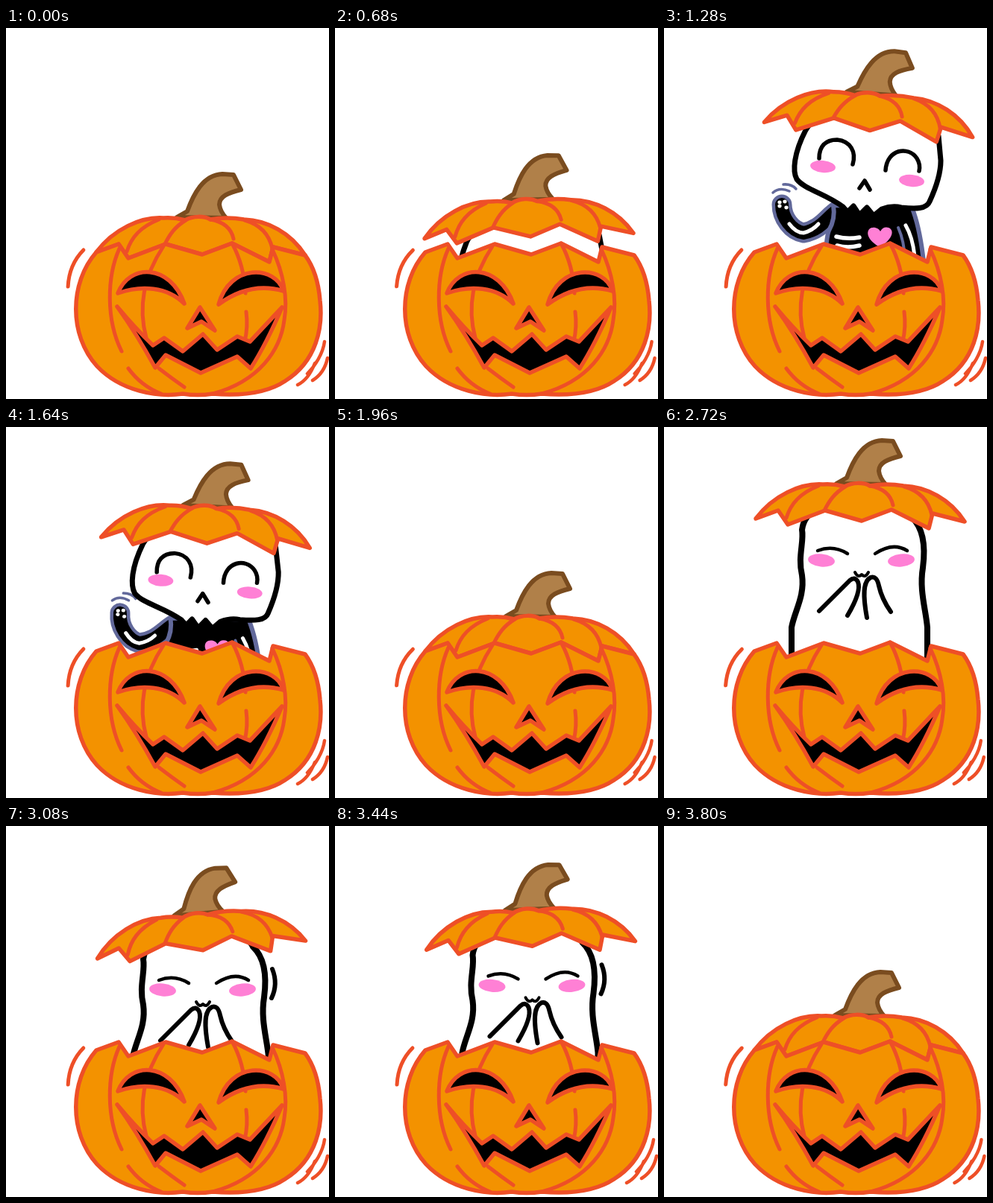
These frames come from a looping animation (433 by 498 pixels, 3840 ms). An HTML page with a canvas:

```html
<!DOCTYPE html>
<html lang="en">
<head>
<meta charset="utf-8">
<title>Pumpkin surprise</title>
<style>
html, body { margin: 0; width: 100%; height: 100%; overflow: hidden; background: #fff; }
canvas { display: block; width: 433px; height: 498px; }
</style>
</head>
<body>
<canvas id="stage" width="433" height="498"></canvas>
<script>
const ctx = document.getElementById('stage').getContext('2d');
const LOOP = 3840, STEP = 40;
const ORANGE = '#f39200', RED = '#ee4f27', BROWN = '#b08049', BARK = '#7a4c1f';
const PINK = '#ff80d5', GLOW = '#62699b', BLACK = '#000', WHITE = '#fff';
ctx.lineCap = ctx.lineJoin = 'round';

const ZIGZAG = 'L358 294L353 314L303 289L263 304L214 290L164 309L151 290L121 301';
const body = new Path2D('M121 301C85 342 84 412 122 454C154 488 204 496 237 491C250 493 264 493 277 491C314 494 350 490 374 474C417 447 425 401 421 366C419 341 412 320 401 305' + ZIGZAG + 'Z');
const bodyLines = new Path2D('M152 296C135 334 134 392 155 434M211 293C186 331 176 371 188 416M164 457C175 472 190 484 208 491M205 457C218 467 229 475 239 482M303 289C314 309 320 333 321 356M322 381C324 396 323 408 320 421M357 297C372 329 378 363 373 392C368 432 340 474 277 491');
const lid = new Path2D('M121 301C144 270 181 253 211 255Q226 254 240 258C251 252 265 252 274 257Q296 253 319 257C350 258 382 275 401 305' + ZIGZAG + 'Z');
const lidLines = new Path2D('M205 257C180 267 168 281 162 300M241 258C226 267 219 278 213 290M274 257C291 260 302 269 305 283M320 258C341 264 353 278 357 296');
const stem = new Path2D('M229 254L243 246C251 224 264 197 290 196L305 197L315 217C298 221 286 226 286 237Q287 246 295 255Z');
const pumpkinEyes = new Path2D('M150 356C165 316 220 316 239 370C216 347 181 345 150 356ZM285 371C300 316 361 318 372 353C341 344 312 351 285 371Z');
const nose = new Path2D('M260 375L243 403L262 394L280 406Z');
const mouth = new Path2D('M149 374Q174 404 197 426L212 416L237 434L264 411L283 432L310 414L327 421L370 375Q349 424 328 457L310 441L261 463L214 439L200 456Q175 410 149 374Z');

const head = new Path2D('M190 137C174 168 172 192 178 203C189 217 216 222 240 240L246 247L254 239L262 251L272 241L281 252L292 243Q306 238 318 241C338 243 352 243 356 233C362 220 371 198 371 178L368 145C355 100 215 92 190 137Z');
const headEyes = new Path2D('M208 175C208 159 216 150 232 150C250 152 258 166 253 183M297 191C299 162 328 158 339 175Q344 183 342 192');
const headNose = new Path2D('M262 215L269 205L276 217');
const torso = new Path2D('M227 238Q230 256 221 272Q214 290 216 400L352 400Q352 290 332 240Z');
const sideArm = new Path2D('M314 268Q322 286 323 310');
const arm = new Path2D('M234 244C218 254 212 270 187 275C171 272 158 255 158 237');
const armBones = new Path2D('M168 263Q177 275 187 275Q199 272 207 263');
const sideBone = new Path2D('M324 265Q333 280 336 306');
const ribs = new Path2D('M231 280Q246 284 262 281M232 292Q246 296 262 292');
const heart = new Path2D('M289 294C266 281 272 266 283 268Q288 269 290 273Q294 266 301 268C311 272 304 286 289 294Z');
const waveLines = new Path2D('M146 221Q155 213 168 219M160 210Q171 209 177 216');

const ghost = new Path2D('M170 420V310C174 288 188 268 184 240C178 215 187 195 184 179C190 125 312 122 331 162C346 176 350 200 346 230C341 260 350 286 352 310V420Z');
const ghostEyes = new Path2D('M205 207Q226 199 245 211M282 211Q306 195 325 207');
const ghostMouth = new Path2D('M255 236Q259 244 264 239Q269 244 273 236');
const ghostHands = new Path2D('M207 288L248 247Q255 241 259 249Q264 262 245 294M271 297C264 259 268 247 276 243Q284 240 287 254Q291 272 303 289');
const ghostShake = new Path2D('M357 192Q365 212 356 231');

const leftMark = new Path2D('M83 347C84 328 91 311 104 298');
const rightMarks = new Path2D('M427 421C425 437 414 454 404 464M414 450C409 463 401 474 391 479M431 443Q427 463 411 473');

// Keys: time, lid shift x, lid shift y, lid tilt in degrees
const keys = [
  [0, 0, 0, 0], [640, 0, 0, 0], [680, -1, -24, -2.3], [760, -1, -118, -4],
  [840, 3, -186, 0], [960, 10, -157, 4], [1120, 1, -162, -4], [1280, 13, -166.5, 3.3],
  [1440, 1, -160, -4], [1600, 8, -155, 3], [1680, 4, -134, 1], [1760, 1, -68, 0],
  [1840, 0, 0, 0], [2520, 0, 0, 0], [2560, 0, -25, -2], [2640, 0, -120, -4],
  [2720, 2, -178, 0], [2800, 4, -150, 4], [2880, 5, -132, 5], [3080, 1, -137, -5.7],
  [3240, 5, -146, 4], [3400, 1, -140, -5], [3520, 3, -150, 2], [3600, 2, -120, 1],
  [3680, 0, -55, 0], [3760, 0, 0, 0], [3840, 0, 0, 0]
];

const slope = (i, c) => (keys[i + 1][c] - keys[i][c]) / (keys[i + 1][0] - keys[i][0]);

// Tangent that stays flat at turning points
function tangent(i, c) {
  if (i === 0 || i === keys.length - 1) return 0;
  const a = slope(i - 1, c), b = slope(i, c);
  return a * b <= 0 ? 0 : 2 * a * b / (a + b);
}

function track(t, c) {
  const i = keys.findIndex((k, n) => n < keys.length - 1 && t < keys[n + 1][0]);
  const p = keys[i], q = keys[i + 1], span = q[0] - p[0], u = (t - p[0]) / span;
  const s = u * u * (3 - 2 * u);
  return p[c] + (q[c] - p[c]) * s
    + span * (tangent(i, c) * u * (1 - u) * (1 - u) - tangent(i + 1, c) * u * u * (1 - u));
}

function wobbleAt(t) {
  if (t > 40 && t < 640) return 1.6 * Math.sin((t - 40) / 240 * 2 * Math.PI);
  if (t > 2020 && t < 2500) return Math.sin((t - 2020) / 240 * 2 * Math.PI);
  return 0;
}

function paint(path, fill, stroke, width) {
  if (fill) { ctx.fillStyle = fill; ctx.fill(path); }
  if (stroke) { ctx.strokeStyle = stroke; ctx.lineWidth = width; ctx.stroke(path); }
}

function oval(x, y, rx, ry, color, tilt = 0) {
  ctx.fillStyle = color;
  ctx.beginPath();
  ctx.ellipse(x, y, rx, ry, tilt, 0, 2 * Math.PI);
  ctx.fill();
}

function turn(x, y, degrees, dx = 0, dy = 0, sy = 1) {
  ctx.translate(x + dx, y + dy);
  ctx.rotate(degrees * Math.PI / 180);
  ctx.scale(1, sy);
  ctx.translate(-x, -y);
}

function group(draw) {
  ctx.save();
  draw();
  ctx.restore();
}

function drawSkeleton(t, dx, dy, tilt) {
  ctx.translate(dx - 13, dy + 166.5);
  group(() => {
    turn(225, 252, 7 * Math.sin((t - 1280) / 320 * 2 * Math.PI));
    paint(arm, null, GLOW, 27);
    paint(arm, null, BLACK, 18);
    paint(armBones, null, WHITE, 5);
    for (const [x, y] of [[155, 234], [162, 233], [155, 239], [164, 241]]) oval(x, y, 2.6, 2.4, WHITE);
    if (dy < -130) paint(waveLines, null, GLOW, 3.5);
  });
  paint(torso, BLACK, GLOW, 6);
  paint(sideArm, null, GLOW, 4);
  paint(ribs, null, WHITE, 5.5);
  paint(sideBone, null, WHITE, 5);
  paint(heart, PINK);
  turn(273, 138, tilt - 3.3);
  paint(head, WHITE, BLACK, 7);
  paint(headEyes, null, BLACK, 5.5);
  paint(headNose, null, BLACK, 5.5);
  oval(213, 186, 17, 8, PINK, 0.1);
  oval(332, 205, 17, 8, PINK, 0.1);
}

function drawGhost(t, dx, dy) {
  ctx.translate(dx - 1, dy + 137);
  paint(ghost, WHITE, BLACK, 8);
  paint(ghostEyes, null, BLACK, 4.5);
  oval(210, 220, 18, 8.5, PINK, 0.1);
  oval(317, 220, 18, 8.5, PINK, -0.1);
  paint(ghostMouth, null, BLACK, 4);
  paint(ghostHands, WHITE, BLACK, 6);
  if (t > 2860 && t < 3560) paint(ghostShake, null, BLACK, 6);
}

function drawLid(dx, dy, tilt) {
  turn(261, 303, tilt, dx, dy);
  paint(stem, BROWN, BARK, 6);
  paint(lid, ORANGE);
  paint(lidLines, null, RED, 5);
  paint(lid, null, RED, 5.5);
}

function drawBody(wobble) {
  turn(260, 440, wobble, 0, 0, 1 + Math.abs(wobble) * 0.018);
  paint(body, ORANGE);
  paint(bodyLines, null, RED, 5);
  paint(body, null, RED, 5.5);
  for (const part of [pumpkinEyes, nose, mouth]) paint(part, BLACK, RED, 5.5);
}

function drawMarks(t) {
  const sway = Math.sin(t / 256 * 2 * Math.PI + 0.3);
  group(() => {
    turn(93, 323, -sway);
    paint(leftMark, null, RED, 5);
  });
  ctx.translate(Math.min(0, sway * 2.5), 0);
  paint(rightMarks, null, RED, 4.5);
}

function render(t) {
  ctx.fillStyle = WHITE;
  ctx.fillRect(0, 0, 433, 498);
  const wobble = wobbleAt(t), dx = track(t, 1), dy = track(t, 2), tilt = track(t, 3);
  if (dy < -8) group(() => {
    ctx.beginPath();
    ctx.rect(0, 0, 433, 440);
    ctx.clip();
    t < 1920 ? drawSkeleton(t, dx, dy, tilt) : drawGhost(t, dx, dy);
  });
  group(() => drawLid(dx + wobble, dy - 1.5 * Math.abs(wobble), tilt - wobble * 1.5));
  group(() => drawBody(wobble));
  group(() => drawMarks(t));
}

function tick() {
  render(Math.floor(performance.now() % LOOP / STEP) * STEP);
  requestAnimationFrame(tick);
}
tick();
</script>
</body>
</html>
```
